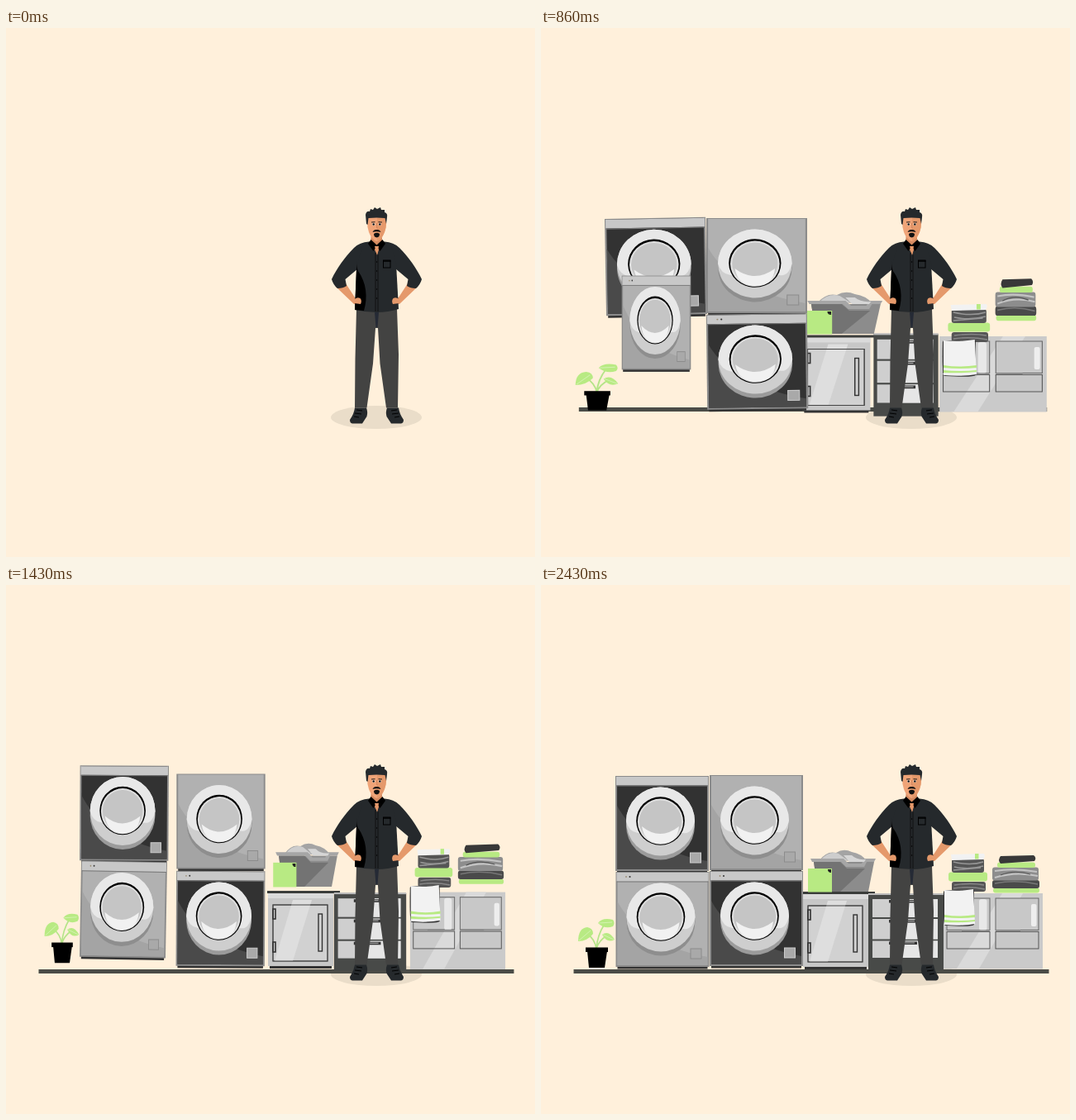
An HTML page that plays this animation: 640x640 px, repeating every 3140 ms.

```html
<!DOCTYPE html>
<html lang="en">
<head>
<meta charset="utf-8">
<title>Laundry room</title>
<style>
html, body { margin: 0; height: 100%; overflow: hidden; background: #fff0db; }
svg { display: block; width: 100vw; height: 100vh; }
</style>
</head>
<body>
<svg id="stage" viewBox="0 0 640 640"></svg>
<script>
const LOOP = 3140, STEPS = 44;
const GREEN = '#b8ea83', INK = '#25292c', SKIN = '#e5996b';
const stage = document.getElementById('stage');

const rect = (x, y, w, h, fill, more = '') =>
  `<rect x="${x}" y="${y}" width="${w}" height="${h}" fill="${fill}" ${more}/>`;
const circle = (x, y, r, fill) => `<circle cx="${x}" cy="${y}" r="${r}" fill="${fill}"/>`;
const path = (d, fill, more = '') => `<path d="${d}" fill="${fill}" ${more}/>`;
const line = (d, color, width = 1) => path(d, 'none', `stroke="${color}" stroke-width="${width}"`);
const frame = (x, y, w, h, color = '#555', width = 1, fill = 'none') =>
  rect(x, y, w, h, fill, `stroke="${color}" stroke-width="${width}"`);
const mirror = (svg) => svg + `<g transform="translate(897 0) scale(-1 1)">${svg}</g>`;

// Drum machine whose upper left corner is at the local origin
function washer(x, y, dark, panel, dots) {
  const front = dark ? '#323232' : '#b1b1b1', shade = dark ? '#4a4a4a' : '#a4a4a4';
  return `<g transform="translate(${x} ${y})">` +
    rect(2, 114, 109, 3.5, '#333') + rect(0, 0, 113, 115, '#8b8b8b') +
    rect(2, 1, 109, 112, front) +
    path('M2 36C18 66 52 92 111 103V113H2Z', shade) +
    (panel ? rect(1, 1, 111, 10.5, '#c8c8c8') + line('M1 12H112', '#777') : '') +
    (dots ? circle(12.5, 6, .9, '#9a8c72') + circle(17, 6, 1, '#333') : '') +
    circle(54.5, 60, 41.5, dark ? '#9b9b9b' : '#8e8e8e') + circle(54.5, 55, 41.5, '#cecece') +
    path('M13 55A41.5 41.5 0 0 1 96 55Q92 71 82 69H27Q16 67 13 55', '#e8e8e8') +
    circle(54.5, 54.5, 29.3, '#000') + circle(54.5, 55.2, 27.6, '#dedede') +
    circle(54.5, 55, 25.5, '#c5c5c5') +
    path('M32 61Q54 79 77 61Q75 82 54.5 82Q35 81 32 61', '#f1f1f1') +
    frame(90.5, 93, 13, 12, dark ? '#ccc' : '#8c8c8c', 1, '#a9a9a9') + '</g>';
}

const basket =
  path('M337 333Q346 321 357 324Q366 318 376 323Q388 325 394 334Z', '#a4a4a4') +
  path('M338 333Q348 321 360 325L371 333Z', '#cdcdcd') +
  path('M330 335H403L396 371H335Z', '#8c8c8c') +
  path('M330 335H362L370 343H392L362 371H335Z', '#737373') +
  path('M326 331H366L372 337H388L391 331H405L403 335H394L391 341H369L363 335H328Z', '#a6a6a6') +
  path('M366 327L373 335H391L393 332Q382 333 376 327Z', '#d6d6d6') +
  rect(323, 343, 29, 28.5, GREEN) + path('M347 344H351V348Q347 348 347 344', '#222');

const cabinet =
  rect(319, 461, 75, 4, '#333') + rect(317, 374, 79, 88, '#c7c7c7') +
  rect(317, 374, 79, 6, '#dadada') + rect(316, 371, 88, 3, '#3b3d3b') +
  frame(323, 388, 66, 68, '#444', 1, '#d1d1d1') +
  path('M347 382H370L347 456H325Z', '#dedede') +
  frame(323, 388, 66, 68, '#444') + frame(378, 399, 4.5, 45, '#333', 1.4) +
  frame(323, 393, 3, 12, '#333', 1.6) + frame(323, 433, 3, 12, '#333', 1.6);

const drawers = rect(396, 374, 91, 92, '#484a48') + rect(396, 373, 91, 2, '#bbb') +
  [[380, 22], [404, 24.5], [430.5, 20.5]].map(([y, h]) =>
    rect(401, y, 79, h, '#cfcfcf') + rect(428, y, 52, h, '#e6e6e6') +
    rect(421, y + 1, 34, 3.5, '#333') + rect(424, y + 2, 28, 1, '#bbb')).join('');

const sideboard =
  rect(487, 373, 120, 91.5, '#cacaca') + path('M558 373H583L530 464H503Z', '#dadada') +
  [491, 550].map((x) => frame(x, 379, 52, 38.5, '#666', 1, '#c8c8c8') +
    frame(x, 419.5, 52, 20.5, '#555', 1, x > 500 ? '#c8c8c8' : 'none')).join('') +
  rect(530, 380, 9.5, 38, '#e8e8e8', 'rx="3"') + rect(593, 386, 6.5, 27, '#eee', 'rx="2"') +
  line('M509 418H543M550 418H580', '#888', 1.6);

const fold = (x, y, w, h, fill) => rect(x, y, w, h, fill, 'rx="3"');
const towels =
  fold(497, 359, 41, 12, '#555') + line('M500 363Q520 360 536 363M499 367Q518 364 537 368', '#888', 1.4) +
  fold(493, 347.5, 47, 11, GREEN) + fold(497, 331, 39, 17, '#555') +
  line('M499 335Q520 340 535 335M500 341Q518 345 535 340M499 345L532 342', '#969696', 1.5) +
  path('M496 326L536 325Q538 329 535 332L497 333Z', '#f2f2f2') + rect(525, 325, 4.5, 6.5, GREEN) +
  path('M487 371L489 369H524V411Q522 414 489 412Q486 411 487 371', '#333') +
  path('M488 369Q506 371 523 368L525 410Q507 413 488 411Z', '#f2f2f2') +
  path('M488 399Q506 402 525 399V402Q506 404 488 402ZM488 405Q506 407 525 405V407Q506 409 488 408Z', GREEN);

const pile =
  fold(547, 366.5, 56, 6, GREEN) + fold(546, 357, 57, 10, '#4a4a4a') +
  line('M549 361Q575 356 601 362', '#777', 1.5) + fold(546, 341.5, 56, 16, '#8d8d8d') +
  line('M549 346Q572 342 600 347M549 354Q575 346 601 352', '#c4c4c4', 2) +
  line('M556 351Q572 344 592 350', '#555', 1.2) +
  fold(552, 335.5, 46, 6.5, GREEN) + path('M556 328L596 327Q600 330 597 334L556 337Q552 333 556 328', '#383838');

const plant =
  line('M67 440Q68 424 77 410M67 440Q65 428 55 421M67 440Q70 430 80 424', '#b5e488', 1.7) +
  path('M45 431Q45 415 56 414Q63 415 63 422Q56 431 45 431', GREEN) +
  path('M69 409Q74 402 87 405Q90 409 87 413Q77 417 69 409', GREEN) +
  path('M74 423Q82 417 89 429Q80 434 74 423', GREEN) +
  line('M46 430L60 418M70 409L86 408M75 423L88 429', '#dff5c4', .7) +
  rect(54, 438.5, 27, 5.5, '#000') + path('M56 443H80L77 463H58Z', '#000');

const man =
  path('M424 340L422.5 400L422 459.5H436.5L444 406L447 363H450L452.5 406L460 459.5H474L475 395L473 340Z', '#434342') +
  path('M446 344H451L449.5 362H447.5Z', '#252a35') +
  mirror(path('M422 459.5H436Q438 465 436.5 470L431 478.5H419Q416 478 416 474Q421 467 422 459.5', INK) +
    line('M424 462L431 463M422 466L430 467M421 470L427 471', '#000', 1)) +
  mirror(path('M399 313L411 309L422 326Q429 325 430 332L428 334H421Z', SKIN)) +
  mirror(path('M439 258.5Q428 259 421 266C410 277 400 291 394 304Q396 311 401 315Q408 315 412 312L410.5 304L426 291L449 300V258Z', INK)) +
  path('M432 260H465L472 285L475 340Q462 344 449 344Q435 344 422 341L424 290Z', INK) +
  path('M424.5 282Q424 290 426 294C436 308 438 326 433 342L422 341Z', '#000') +
  mirror(path('M421 329Q424 325 428.5 327Q431 330 429 334L421.5 333Z', SKIN)) +
  line('M447 272V343M450 274V343', '#000', .6) +
  [283, 294, 305, 316, 327].map((y) => circle(448.5, y, .7, '#000')).join('') +
  frame(456.5, 281, 8.5, 9, '#000', 1) + line('M456 282H465.5', '#000', 1.5) +
  path('M442 248H455V258L449 274L441 259Z', '#d58b61') +
  mirror(path('M441.5 256L438 261L444.5 270L449 263Z', '#000')) +
  path('M446 264H451L449 275Z', SKIN) +
  path('M437.5 228H459.5Q461 239 458 247Q454 257 448.5 258Q443 257 439 247Q436 238 437.5 228', '#efa478') +
  path('M449 230H459.5Q461 239 458 247Q454 257 449 258Z', SKIN) +
  path('M436 237L435 226Q436 221 440 222L441 219L444 220L446 217L449 219L453 217L454 220L458 220L458 223Q462 224 461 229L460 237L458.5 230Q448 229 438.5 230L437.5 238Z', INK) +
  line('M442 235L446.5 234.7M450.5 234.7L455 235', '#222', 1) +
  line('M448.5 236V242H450', '#c97f58', .7) +
  path('M443.5 247Q445 243.5 448.5 244Q452 243.5 453.5 247Q448.5 245.5 443.5 247', '#111') +
  path('M445 249Q448.5 246.5 452 249Q452 253 448.5 253.5Q445 253 445 249', '#111') +
  '<g id="eyes">' + [444.7, 452.3].map((x) =>
    `<ellipse cx="${x}" cy="237.5" rx="1.7" ry="1.4" fill="#fff"/>` + circle(x, 237.5, 1.2, '#000')).join('') + '</g>';

// Key poses: [dx, dy, turn, scaleX, scaleY] at fixed steps, ending at rest
const TIMES = [8, 10, 12, 16, 20, 25], REST = [0, 0, 0, 1, 1];

function poses(start, grown, ...later) {
  const [dx, dy, sx = .1, sy = sx] = start;
  const burst = sx ? 1.12 : .5;
  const mid = [(dx + grown[0]) / 2, (dy + grown[1]) / 2, grown[2] * 2, grown[3] * burst, grown[4] * burst];
  return [[dx, dy, 0, sx, sy], mid, grown, ...later, REST];
}

const parts = [
  { at: [360, 418], svg: cabinet, keys: poses([0, 14], [1, .5, 0, 1.04, 1], [0, -.5, 0, .98, 1], [0, -1, 0, 1, 1]) },
  { at: [441.5, 420], svg: drawers, keys: poses([0, 12], [0, 0, 0, .86, 1.08], [2, 0, 0, 1.09, .94], [-1, 0, 0, .96, 1.02]) },
  { at: [547, 418.5], svg: sideboard, keys: poses([3.5, 21], [0, 0, 0, 1.08, 1], [0, 0, 0, .98, 1.01], [-.5, -.5, 0, .96, 1.02]) },
  { at: [364, 347], svg: basket, keys: poses([-3, -35, .31, .42], [2, -1, 0, 1.15, 1], [-2.5, -19, 0, .95, 1.06], [-1, -7, 0, .97, 1.04]) },
  { at: [146.5, 289], svg: washer(90, 231, true, true),
    keys: poses([-7, 4.5], [-7.5, 0, -1, 1.08, 1.02], [-7, -19, 6.2, .98, 1.02], [-3.5, -12.5, .3, .95, 1]) },
  { at: [260.5, 288], svg: washer(204, 230, false, false),
    keys: poses([-4.5, 13], [.5, 0, 0, 1.08, 1], [-.5, 0, 0, .98, 1.01], [-.5, -1.5, 0, .95, 1]) },
  { at: [260.5, 404], svg: washer(204, 346, true, true, true),
    keys: poses([-15, 18], [1, 0, -.7, 1.08, 1], [0, 2, 6.2, .99, 1], [-1, 0, .3, .95, 1]) },
  { at: [147, 405], svg: washer(90.5, 347, false, true, true),
    keys: poses([-8, -50, 0], [-7.5, -48, 0, .74, .99], [-4, 0, 5.5, 1.21, .93], [-5, -12, 1, .92, 1.01]) },
  { at: [513, 368], svg: towels, keys: poses([6, 9], [1, 9, 0, 1.08, 1], [2, -10, 0, .98, 1.03], [1, -5, 0, .97, 1.02]) },
  { at: [574, 350], svg: pile, keys: poses([0, -25, 0], [0, -21, 0, .87, 1.12], [0, -14, 0, 1.09, 1], [0, -12, 0, .97, 1.06]) },
  { at: [67, 433], svg: plant, keys: poses([.5, -24, .3, .4], [.5, 1, 0, 1.17, .95], [.5, -18, 0, .93, 1.04], [.5, -6, 0, .95, 1.01]) }
];
const floor = {
  at: [327, 467.5], svg: rect(39.5, 465, 575, 5, '#4b4c47'), times: [4, 6, 8, 12, 16, 20],
  keys: [[0, 0, 0, .1, .4], [-6, 0, 0, 1.04, 1], [-3, 0, 0, 1.02, 1], [2, -6, 0, .985, 1], [2, -1, 0, .982, 1], REST]
};
const all = [floor, ...parts];

stage.innerHTML = '<ellipse cx="448" cy="471" rx="55" ry="14" fill="#eaddc9"/>' +
  all.map((p) => `<g class="part">${p.svg}</g>`).join('') + man;
const groups = stage.querySelectorAll('.part');
const eyes = document.getElementById('eyes');

// Smooth curve through the key poses
function poseAt(keys, times, step) {
  const last = keys.length - 1;
  if (step >= times[last]) return keys[last];
  let i = 0;
  while (step >= times[i + 1]) i++;
  const span = times[i + 1] - times[i], u = (step - times[i]) / span;
  return REST.map((_, c) => {
    const slope = (j) => j < 1 || j >= last ? 0
      : (keys[j + 1][c] - keys[j - 1][c]) / (times[j + 1] - times[j - 1]) * span;
    const a = keys[i][c], b = keys[i + 1][c];
    return a + (b - a) * u * u * (3 - 2 * u) +
      slope(i) * u * (1 - u) ** 2 - slope(i + 1) * u * u * (1 - u);
  });
}

const lids = { 31: .5, 32: .12, 33: .5 };

function draw(now) {
  const step = Math.floor((now % LOOP) / LOOP * STEPS + .1);
  all.forEach(({ at: [x, y], keys, times = TIMES }, i) => {
    const hidden = step < times[0];
    groups[i].style.display = hidden ? 'none' : '';
    if (hidden) return;
    const [dx, dy, turn, sx, sy] = poseAt(keys, times, step);
    groups[i].setAttribute('transform',
      `translate(${x + dx} ${y + dy}) rotate(${turn}) scale(${sx} ${sy}) translate(${-x} ${-y})`);
  });
  eyes.setAttribute('transform', `translate(0 237.5) scale(1 ${lids[step] || 1}) translate(0 -237.5)`);
}

const begin = performance.now();
function tick() {
  draw(performance.now() - begin);
  requestAnimationFrame(tick);
}
tick();
</script>
</body>
</html>
```
